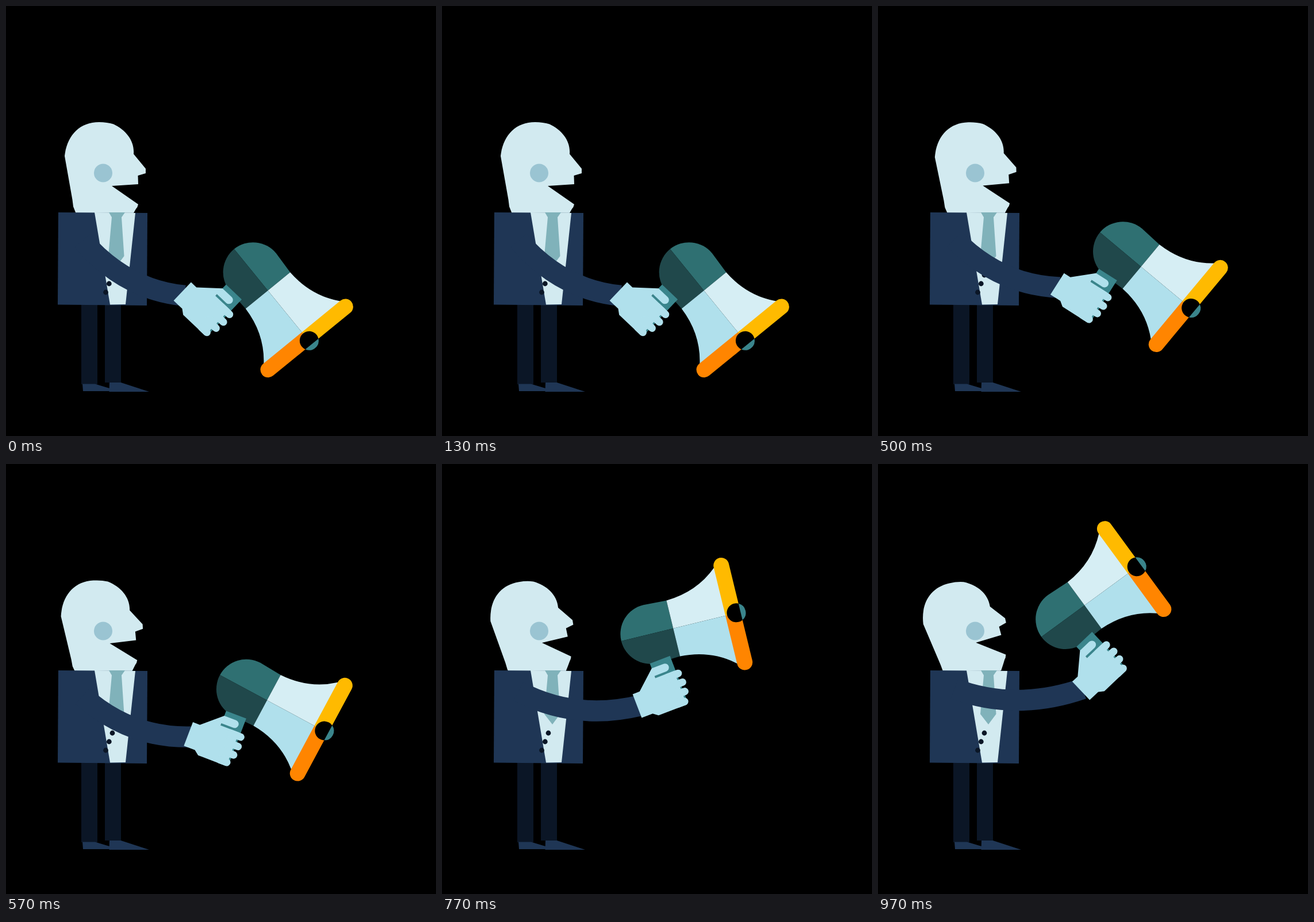
Animation, 748 px wide and 748 px high, one loop 4.03 s. Source, as an HTML page:

```html
<!DOCTYPE html>
<html lang="en">
<head>
<meta charset="utf-8">
<title>Man raising a megaphone</title>
<style>
  html, body { margin: 0; height: 100%; overflow: hidden; background: #000; }
  svg { display: block; width: 100%; height: 100%; }
</style>
</head>
<body>
<svg viewBox="0 0 748 748">
  <g id="legs">
    <path fill="#0b1626" d="M131 519h28v139h-28zM172 519h28v136h-28z"/>
    <path fill="#1f3655" d="M133 657.500H155L180 665V670H134zM180 655H200L249 671H179.500z"/>
  </g>

  <path id="head" fill="#d2eaf0" d="M102 261C106 226 127 202 162 202Q176 202 187 205.500C209 216 224 235 222 257.500L243 283V291L229.500 295L230 310L184 313L230 345Q229 350 226 353L222 360L216 370L160 385L125 372L121 359L117 349L115.500 337Z"/>
  <circle cx="169" cy="290.500" r="16" fill="#9ac4d2"/>

  <g id="suit">
    <path fill="#1f3655" d="M91 359L246 360L245 521L90 519.500z"/>
    <path fill="#d2eaf0" d="M154 359L225 360L208 519L181 519.500z"/>
    <path fill="#80b2ba" d="M179 359H207L201 367.500L205.500 435L192 453L178 435L184 367.500z"/>
    <g fill="#0b1626">
      <circle cx="185" cy="468" r="4.400"/>
      <circle cx="179.300" cy="483" r="4.400"/>
      <circle cx="173.500" cy="498" r="4.400"/>
    </g>
  </g>

  <path id="arm" fill="none" stroke="#1f3655" stroke-width="36.500"/>

  <g id="hand">
    <!-- megaphone, drawn along its own axis -->
    <g transform="translate(541 355) rotate(7.300)">
      <path fill="#2f7072" d="M-107 0H-200A52 52 0 0 1 -148 -52L-107 -50z"/>
      <path fill="#20484b" d="M-107 0H-200A52 52 0 0 0 -148 52L-107 50z"/>
      <path fill="#d6eef4" d="M-107 0V-50Q-52 -52 -13 -86L-10 0z"/>
      <path fill="#b0e0ec" d="M-107 0V50Q-52 52 -13 86L-10 0z"/>
      <path fill="#ffba00" d="M-13.500 0V-86.700a13.500 13.500 0 0 1 27 0V0z"/>
      <path fill="#ff8500" d="M-13.500 0V86.700a13.500 13.500 0 0 0 27 0V0z"/>
      <circle cx="6" cy="-.500" r="16.500"/>
      <path fill="#3a858c" d="M13.500 -15.200A16.500 16.500 0 0 1 13.500 14.200z"/>
    </g>
    <path fill="#3a858c" d="M375 384H412.500V464H375z"/>
    <path fill="#b0e0ec" d="M328 423H341L375 393H397a7 7 0 0 1 0 14H375V411H409.500V473.500H357L348.500 467H328z"/>
    <path stroke="#b0e0ec" stroke-width="13" stroke-linecap="round" d="M395 417.500H415M395 434.500H416.500M395 451H414.500M395 467.200H408"/>
  </g>
</svg>
<script>
  const LOOP = 4030, FPS = 30, START = 370, LENGTH = 600;
  const [head, arm, hand] = ["head", "arm", "hand"].map(id => document.getElementById(id));
  const mix = (a, b, p) => a.map((v, i) => v + (b[i] - v) * p);

  function draw(now) {
    // hold each picture for one step of the frame rate
    const t = Math.floor((now % LOOP + 3.4) * FPS / 1000) * 1000 / FPS;
    const u = Math.min(1, Math.max(0, (t - START + 3.4) / LENGTH));
    const p = u * u * (3 - 2 * u);

    head.setAttribute("transform", `rotate(${-13 * p} 167 372)`);

    const [sx, sy, cx, cy, ex, ey] =
      mix([133, 408, 207, 494, 311, 504], [133, 391, 240, 431, 356, 391], p);
    arm.setAttribute("d", `M${sx} ${sy}Q${cx} ${cy} ${ex} ${ey}`);

    const [x, y, turn] = mix([311.5, 502.4, 43.5], [359.2, 390.1, -43.5], p);
    hand.setAttribute("transform",
      `translate(${x} ${y}) rotate(${turn}) translate(-335.5 -446)`);
  }

  const t0 = performance.now();
  function tick() {
    draw(performance.now() - t0);
    requestAnimationFrame(tick);
  }
  tick();
</script>
</body>
</html>
```
